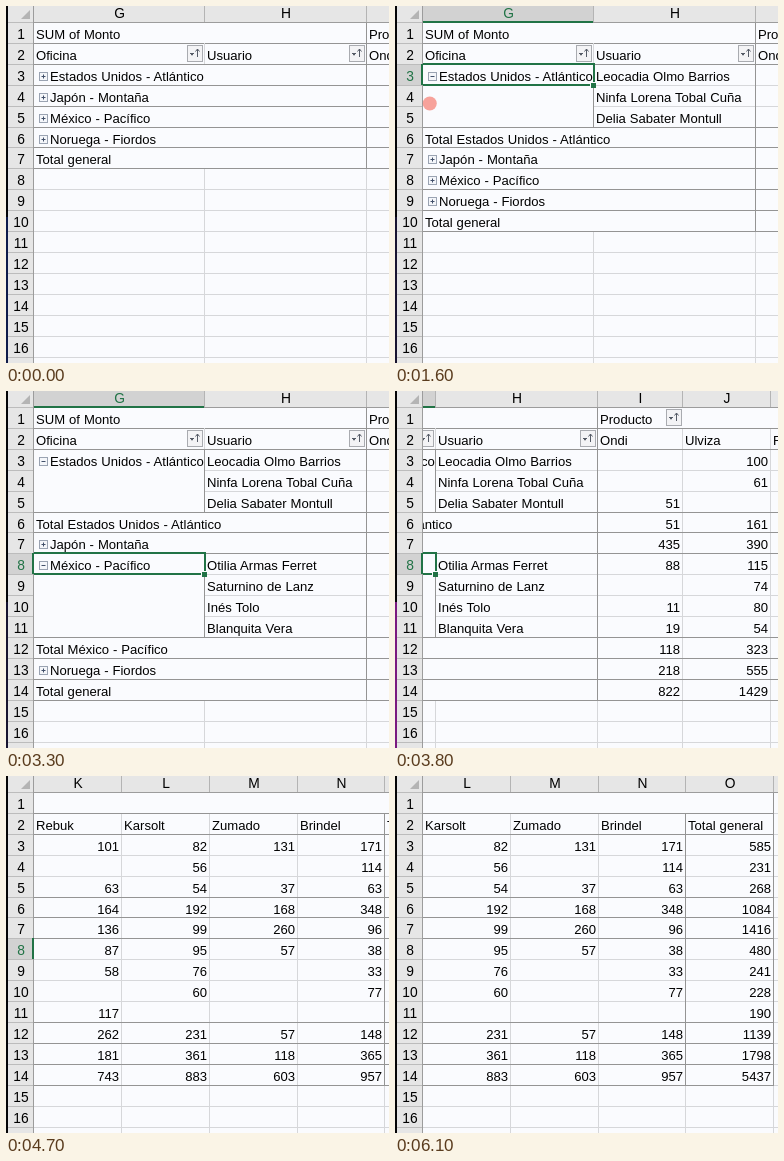
Recreate the animation shown at these times as an HTML page. Size 383 px wide and 357 px high, loop 6200 ms.

```html
<!DOCTYPE html>
<html lang="es">
<head>
<meta charset="utf-8">
<title>Tabla dinámica</title>
<style>
  html, body { margin: 0; width: 100%; height: 100%; overflow: hidden; background: #fafbfe; }
  svg { display: block; }
  text { font: 13.1px "Liberation Sans", Arial, sans-serif; word-spacing: .3px; fill: #000; white-space: pre; }
  .head { font-size: 13.8px; text-anchor: middle; }
  .end { text-anchor: end; }
  .on { fill: #217346; }
</style>
</head>
<body>
<svg id="stage" width="383" height="357" viewBox="0 0 383 357"></svg>
<script>
const LOOP = 6200, STEP = 100;
const PAPER = '#fafbfe', HEAD = '#e6e6e6', ACTIVE = '#d2d2d2';
const GRID = '#d6d7da', RULE = '#949494', GREEN = '#217346';

// Left edge of columns G to P, plus the end of P.
const cols = [28, 199, 361, 446, 534, 622, 710, 798, 885, 973, 1061];
const rowTop = n => Math.floor(16.4 + 20.93 * (n - 1));
const base = n => rowTop(n) + 17;

const products = ['Ondi', 'Ulviza', 'Rebuk', 'Karsolt', 'Zumado', 'Brindel'];
const offices = [
  ['Estados Unidos - Atlántico', [
    ['Leocadia Olmo Barrios', [0, 100, 101, 82, 131, 171]],
    ['Ninfa Lorena Tobal Cuña', [0, 61, 0, 56, 0, 114]],
    ['Delia Sabater Montull', [51, 0, 63, 54, 37, 63]]]],
  ['Japón - Montaña', [['', [435, 390, 136, 99, 260, 96]]]],
  ['México - Pacífico', [
    ['Otilia Armas Ferret', [88, 115, 87, 95, 57, 38]],
    ['Saturnino de Lanz', [0, 74, 58, 76, 0, 33]],
    ['Inés Tolo', [11, 80, 0, 60, 0, 77]],
    ['Blanquita Vera', [19, 54, 117, 0, 0, 0]]]],
  ['Noruega - Fiordos', [['', [218, 555, 181, 361, 118, 365]]]]
];

const rect = (x, y, w, h, fill, more = '') =>
  `<rect x="${x}" y="${y}" width="${w}" height="${h}" fill="${fill}" ${more}/>`;
const hline = (x1, x2, y, c) => rect(x1, y, x2 - x1, 1, c);
const vline = (x, y1, y2, c) => rect(x, y1, 1, y2 - y1, c);
const text = (x, y, s, cls = '') => `<text x="${x}" y="${y}" class="${cls}">${s}</text>`;
const path = (d, c) => `<path d="${d}" fill="none" stroke="${c}"/>`;
const sumOf = list => list.reduce((a, b) => a + b, 0);
const sumUsers = users => products.map((_, i) => sumOf(users.map(u => u[1][i])));

function sortButton(x, y) {
  return rect(x + .5, y + .5, 15, 16, '#f3f3f5', 'stroke="#a9abb0"') +
    path(`M${x + 10.5} ${y + 12}v-8m-2 2.5l2 -2.5l2 2.5`, '#555b66') +
    path(`M${x + 3} ${y + 8.5}h4m-3 1h2m-1 0v1`, '#555b66');
}

function expander(n, open) {
  const y = rowTop(n) + 8;
  return rect(33.5, y + .5, 8, 8, '#f4f6fa', 'stroke="#9aa3b2"') +
    path(`M35.5 ${y + 4.5}h4` + (open ? '' : `M37.5 ${y + 2.5}v4`), '#42506a');
}

function numbers(n, values) {
  return [...values, sumOf(values)].map((v, i) =>
    v ? text(cols[i + 3] - 3, base(n), v, 'end') : '').join('');
}

function gridLines() {
  let s = '';
  for (let n = 2; n <= 17; n++) s += hline(28, 1061, rowTop(n), GRID);
  for (const x of cols.slice(1)) s += vline(x - 1, rowTop(2), 357, GRID);
  return s;
}

// Sheet contents with the given offices expanded.
function pivot(open) {
  let n = 3, body = '', rules = '';
  const rule = row => { rules += hline(28, 973, rowTop(row), RULE); };
  rule(2);
  rule(3);
  offices.forEach(([name, users], i) => {
    const first = n, isOpen = open.includes(i);
    body += expander(n, isOpen);
    const label = text(44, base(n), name);
    body += isOpen ? `<g clip-path="url(#colG)">${label}</g>` : label;
    if (isOpen) {
      for (const [user, values] of users) {
        body += text(201, base(n), user) + numbers(n, values);
        n++;
        rules += hline(199, 360, rowTop(n), GRID);
      }
      rules += vline(198, rowTop(first), rowTop(n), RULE);
      rule(n);
      body += text(30, base(n), 'Total ' + name);
    }
    body += numbers(n, sumUsers(users));
    rule(++n);
  });
  body += text(30, base(n), 'Total general') +
    numbers(n, sumUsers(offices.flatMap(o => o[1])));
  rule(++n);

  const bottom = rowTop(n);
  rules += vline(198, rowTop(2), rowTop(3), GRID) + vline(360, rowTop(1), bottom, RULE) +
    vline(884, rowTop(2), bottom, RULE) + vline(972, rowTop(1), bottom, RULE);
  return gridLines() + rect(28, 17, 332, bottom - 17, PAPER) + rules + body +
    text(30, base(1), 'SUM of Monto') + text(363, base(1), 'Producto') +
    text(30, base(2), 'Oficina') + text(201, base(2), 'Usuario') +
    [...products, 'Total general'].map((p, i) => text(cols[i + 2] + 2, base(2), p)).join('') +
    sortButton(181, rowTop(2) + 2) + sortButton(343, rowTop(2) + 2) + sortButton(429, rowTop(1) + 2);
}

function columnHeads() {
  let s = rect(28, 0, 1033, 16, HEAD) + rect(28, 0, 170, 16, ACTIVE, 'id="headG"');
  for (let i = 0; i < 10; i++) {
    s += text((cols[i] + cols[i + 1]) / 2, 12, 'GHIJKLMNOP'[i], 'head col') +
      vline(cols[i + 1] - 1, 0, 16, '#b4b4b4');
  }
  return s + hline(28, 1061, 16, '#9c9c9c') + rect(28, 15, 170, 2, GREEN, 'id="lineG"');
}

function rowHeads() {
  let s = rect(2, 0, 26, 357, HEAD);
  s += rect(2, 0, 25, 20, ACTIVE, 'id="rowFill"');
  s += '<path d="M24 4v9h-9z" fill="#b4b4b4"/>';
  for (let n = 1; n <= 17; n++) {
    s += hline(2, 28, rowTop(n), '#bcbcbc');
    if (n < 17) s += text(15, base(n), n, 'head row');
  }
  return s + vline(27, 0, 357, '#9c9c9c') + rect(26, 0, 2, 21, GREEN, 'id="rowLine"');
}

const stage = document.getElementById('stage');
stage.innerHTML = `
  <defs>
    <clipPath id="colG"><rect x="28" y="0" width="170" height="357"/></clipPath>
    <clipPath id="view"><rect x="27" y="0" width="356" height="357"/></clipPath>
  </defs>
  ${rect(0, 0, 383, 357, PAPER)}
  <g clip-path="url(#view)"><g id="sheet">
    ${[[], [0], [0, 2]].map(o => `<g class="state">${pivot(o)}</g>`).join('')}
    ${columnHeads()}
    <g id="cell">
      <rect x="27" y="0" width="172" height="21" fill="none" stroke="${GREEN}" stroke-width="2"/>
      ${rect(195, 18, 6, 6, PAPER)}${rect(196, 19, 5, 5, GREEN)}
    </g>
  </g></g>
  ${rowHeads()}
  <circle id="halo" r="7" fill="#f4503f" opacity=".52"/>
  ${rect(0, 0, 2, 357, '#050507')}
  ${rect(0, 211, 2, 146, '#050507', 'id="edge"')}`;

const $ = id => document.getElementById(id);
const set = (id, attrs) => { for (const k in attrs) $(id).setAttribute(k, attrs[k]); };
const show = (el, on) => el.setAttribute('visibility', on ? 'visible' : 'hidden');
const states = [...document.querySelectorAll('.state')];
const rowLabels = [...document.querySelectorAll('.row')];
const labelG = document.querySelector('.col');

// Linear track through [time, value] pairs.
function track(t, keys) {
  if (t <= keys[0][0]) return keys[0][1];
  for (let i = 1; i < keys.length; i++) {
    const [t0, a] = keys[i - 1], [t1, b] = keys[i];
    if (t <= t1) return a + (b - a) * (t - t0) / (t1 - t0);
  }
  return keys[keys.length - 1][1];
}
const latest = (t, keys) => keys.filter(k => k[0] <= t).pop()[1];

const scrollKeys = [[3500, 0], [3800, 158], [4300, 414], [4600, 506], [4800, 506], [5100, 594]];
const haloX = [[0, 400], [100, 300], [500, 34.5], [1500, 34.5], [2100, 36], [2600, 36], [2800, 240]];
const haloY = [[0, 60], [100, 63], [500, 67], [1400, 67], [2100, 174], [2600, 174], [2800, 380]];
const edgeKeys = [[0, '#101c4a'], [1000, '#14224e'], [1500, '#181430'], [3600, '#7a1a80'],
  [4300, '#341030'], [4600, '#050507']];

function draw(time) {
  const t = Math.floor(time % LOOP / STEP) * STEP;
  const state = latest(t, [[0, 0], [1100, 1], [2700, 2]]);
  const picked = latest(t, [[0, 0], [800, 3], [2500, 8], [6100, 0]]);

  states.forEach((g, i) => show(g, i === state));
  set('sheet', { transform: `translate(${-Math.round(track(t, scrollKeys))} 0)` });
  for (const id of ['cell', 'headG', 'lineG', 'rowFill', 'rowLine']) show($(id), picked);
  rowLabels.forEach((el, i) => el.classList.toggle('on', i + 1 === picked));
  labelG.classList.toggle('on', picked > 0);
  if (picked) {
    const y = rowTop(picked);
    set('cell', { transform: `translate(0 ${y})` });
    set('rowFill', { y: y + 1 });
    set('rowLine', { y });
  }
  set('halo', { cx: track(t, haloX), cy: track(t, haloY) });
  set('edge', { fill: latest(t, edgeKeys) });
}

const start = performance.now();
function tick() {
  draw(performance.now() - start);
  requestAnimationFrame(tick);
}
tick();
</script>
</body>
</html>
```
